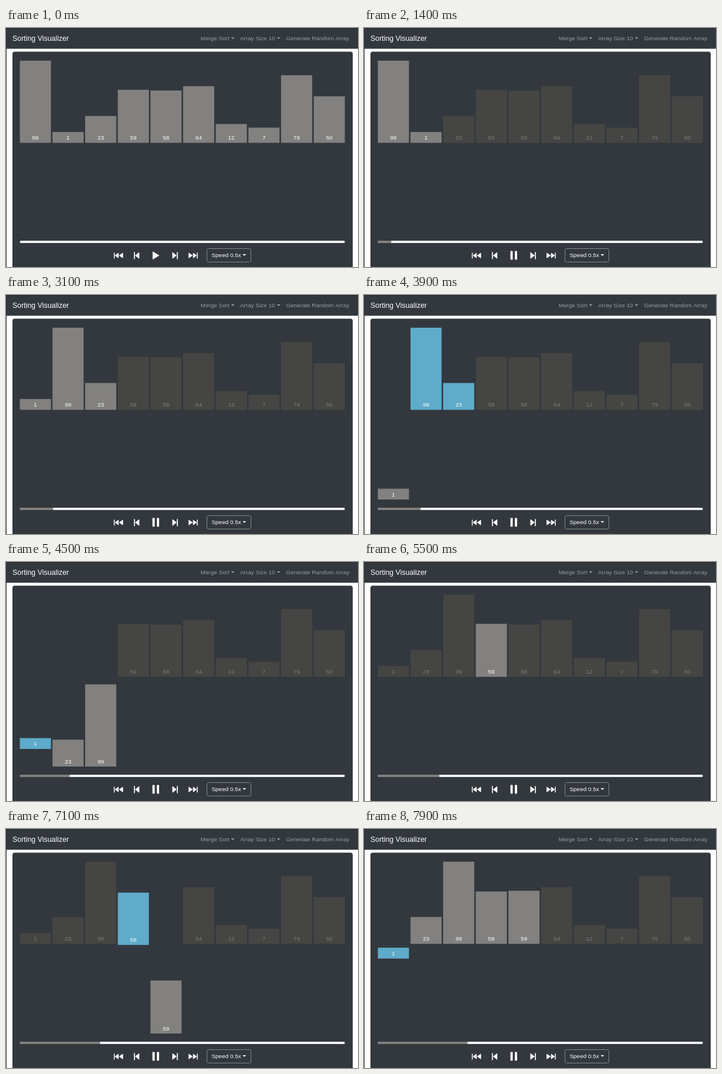
An HTML page with a canvas for the animation above (8 s loop, 600x409 px).

```html
<!DOCTYPE html>
<html lang="en">
<head>
<meta charset="utf-8">
<title>Sorting Visualizer</title>
<style>
  html, body { margin: 0; width: 100%; height: 100%; overflow: hidden; background: #fff; }
  canvas { display: block; width: 600px; height: 409px; }
</style>
</head>
<body>
<canvas id="stage" width="600" height="409"></canvas>
<script>
const ctx = document.getElementById('stage').getContext('2d');
const LOOP = 8000;
const VALUES = [99, 1, 23, 59, 58, 64, 12, 7, 79, 50];
const DARK = '#32383e', LIT = '#82817f', DIM = '#454543', BLUE = '#5eabca';
const FONT = '"Liberation Sans", Arial, sans-serif';

// Pairs of time in ms and step number; steps run evenly in between.
const PACE = [[250, 0], [1410, 5], [3130, 12], [4447, 17], [5550, 21],
              [6455, 25], [7430, 28], [7856, 30], [8130, 31]];

const range = (lo, hi) => Array.from({ length: hi - lo + 1 }, (_, i) => lo + i);

function buildSteps() {
  const steps = [];
  const order = VALUES.slice();
  const place = new Map(VALUES.map((v, i) => [v, { slot: i, row: 0 }]));

  function add(lit, active = [], target = null) {
    steps.push({ lit, active, target, place: new Map(place) });
    if (target) place.set(active[0], target);
  }

  function merge(lo, mid, hi) {
    const lit = order.slice(lo, hi + 1);
    const left = order.slice(lo, mid + 1);
    const right = order.slice(mid + 1, hi + 1);
    const out = [];
    add(lit);
    while (left.length || right.length) {
      if (left.length && right.length) add(lit, [left[0], right[0]]);
      const fromLeft = !right.length || (left.length && left[0] < right[0]);
      const v = (fromLeft ? left : right).shift();
      add(lit, [v], { slot: lo + out.length, row: 1 });
      out.push(v);
    }
    out.forEach((v, i) => {
      add(lit, [v], { slot: lo + i, row: 0 });
      order[lo + i] = v;
    });
  }

  function sort(lo, hi) {
    if (lo === hi) return add([order[lo]]);
    const mid = (lo + hi) >> 1;
    sort(lo, mid);
    sort(mid + 1, hi);
    merge(lo, mid, hi);
  }

  add(VALUES);
  add(VALUES);
  sort(0, VALUES.length - 1);
  return steps;
}

const STEPS = buildSteps();

function stepAt(t) {
  if (t <= PACE[0][0]) return 0;
  const i = PACE.findIndex(p => p[0] > t);
  const [t0, s0] = PACE[i - 1], [t1, s1] = PACE[i];
  return s0 + (s1 - s0) * (t - t0) / (t1 - t0);
}

function rect(x, y, w, h, color) {
  ctx.fillStyle = color;
  ctx.fillRect(x, y, w, h);
}

function rounded(x, y, w, h, r) {
  ctx.beginPath();
  ctx.roundRect(x, y, w, h, r);
}

function text(str, x, y, color, size = 9.92, align = 'left') {
  ctx.font = size + 'px ' + FONT;
  ctx.textAlign = align;
  ctx.fillStyle = color;
  ctx.fillText(str, x, y);
}

function triangle(x1, y1, x2, y2, x3, y3, color = '#fff') {
  ctx.fillStyle = color;
  ctx.beginPath();
  ctx.moveTo(x1, y1);
  ctx.lineTo(x2, y2);
  ctx.lineTo(x3, y3);
  ctx.fill();
}

const caret = (x, y, color) => triangle(x, y, x + 6, y, x + 3, y + 3, color);

// Sideways arrowhead from its flat edge to its tip, with softened corners.
function arrow(base, tip, half) {
  triangle(base, 389.3 - half, tip, 389.3, base, 389.3 + half);
  ctx.strokeStyle = '#fff';
  ctx.lineWidth = 1;
  ctx.lineJoin = 'round';
  ctx.closePath();
  ctx.stroke();
}

function drawPage() {
  rect(0, 0, 600, 409, '#fff');
  rect(0, 0, 600, 35.5, DARK);
  rect(0, 0, 600, 1, '#26292d');
  rect(0, 0, 1, 409, '#303338');
  ctx.fillStyle = DARK;
  rounded(11, 40.5, 580, 380, 4);
  ctx.fill();

  const link = '#999c9f';
  text('Sorting Visualizer', 11, 22, '#fff', 12.4);
  text('Merge Sort', 331.7, 21, link);
  caret(383.5, 16, link);
  text('Array Size 10', 399, 21, link);
  caret(461.6, 16, link);
  text('Generate Random Array', 477.2, 21, link);
}

function drawBar(v, slot, row, color, ink) {
  const h = 17.3 + 1.245 * v;
  const x = 23.6 + 55.66 * slot;
  const bottom = 196.5 + 153.5 * row;
  rect(x, bottom - h, 53, h, color);
  text(v, x + 26.5, bottom - 5.5, ink, 9.92, 'center');
}

function drawBars(t) {
  const s = stepAt(t);
  const step = STEPS[Math.floor(s)];
  const k = s % 1;
  const back = VALUES.filter(v => !step.active.includes(v));
  for (const v of back) {
    const { slot, row } = step.place.get(v);
    const lit = step.lit.includes(v);
    drawBar(v, slot, row, lit ? LIT : DIM, lit ? '#fff' : '#7e7e7c');
  }
  for (const v of step.active) {
    const from = step.place.get(v);
    const to = step.target || from;
    drawBar(v, from.slot + (to.slot - from.slot) * k,
            from.row + (to.row - from.row) * k, BLUE, '#fff');
  }
}

function drawProgress(t) {
  ctx.save();
  rounded(23.6, 364, 554, 4, 2);
  ctx.clip();
  rect(23, 364, 556, 4, '#eef4f3');
  rect(23, 364, 0.6 + Math.max(0, (t - 260) * 0.02), 4, '#827f7d');
  ctx.restore();
}

function drawControls(playing) {
  rect(183.8, 384.5, 1.5, 10, '#fff');
  arrow(191.5, 186, 4);
  arrow(199, 193, 4);

  rect(218, 383.5, 1.7, 12, '#fff');
  arrow(226.8, 220.5, 5);

  if (playing) {
    for (const x of [249.6, 257.1]) {
      ctx.fillStyle = '#fff';
      rounded(x, 381.5, 3.9, 15, 1);
      ctx.fill();
    }
  } else {
    arrow(250.3, 260.7, 6.3);
  }

  arrow(284, 290.3, 5);
  rect(291.2, 383.5, 1.7, 12, '#fff');

  arrow(311.7, 317.7, 4);
  arrow(319.2, 324.7, 4);
  rect(325.3, 384.5, 1.5, 10, '#fff');

  ctx.strokeStyle = '#85898c';
  ctx.lineWidth = 1;
  rounded(342.5, 377.5, 75, 23, 3);
  ctx.stroke();
  text('Speed 0.5x', 350.5, 392.3, '#fff');
  caret(403.3, 387, '#fff');
}

function draw(t) {
  drawPage();
  drawBars(t);
  drawProgress(t);
  drawControls(t >= 100);
}

const start = performance.now();
function tick() {
  draw((performance.now() - start) % LOOP);
  requestAnimationFrame(tick);
}
tick();
</script>
</body>
</html>
```
